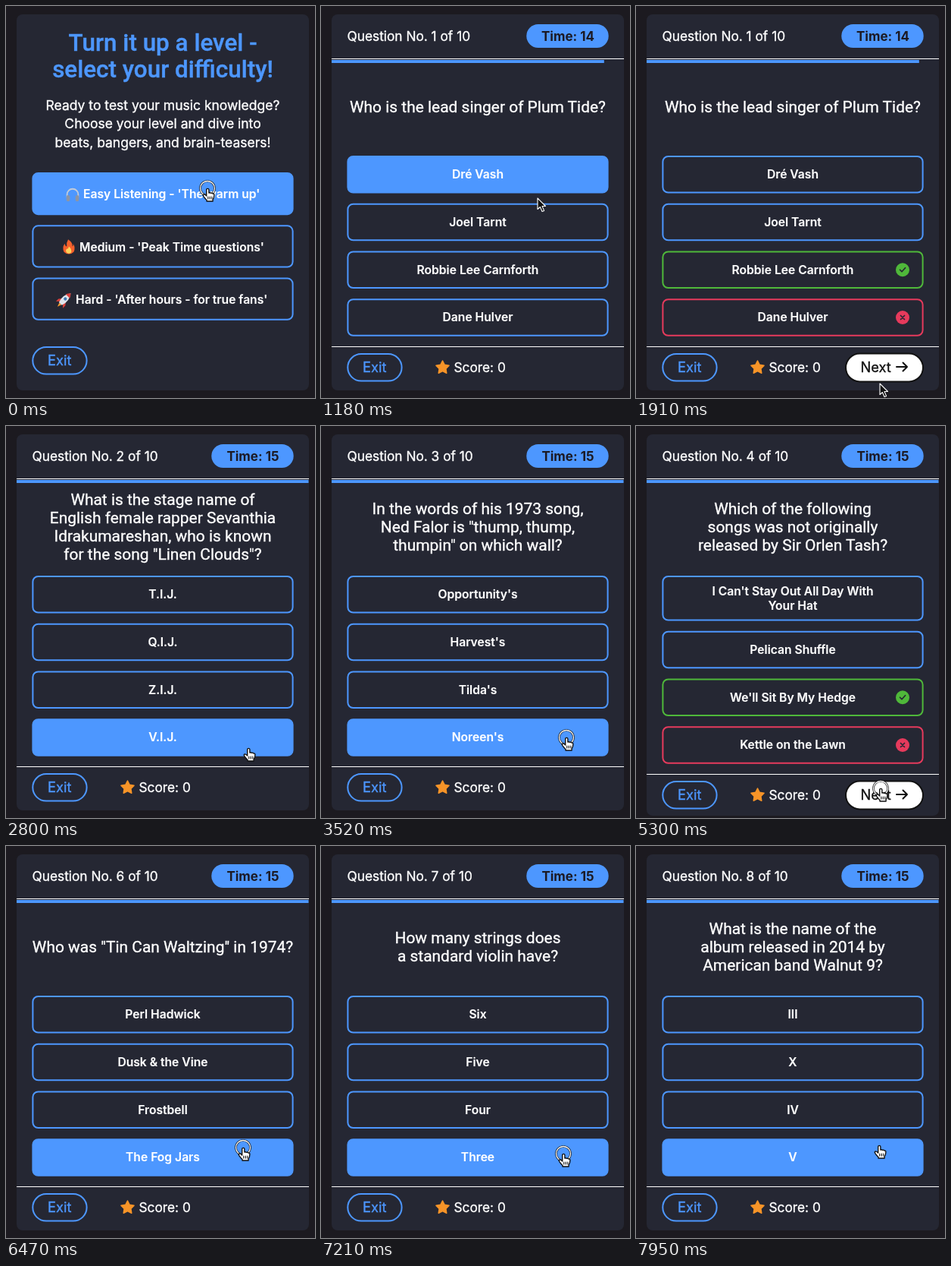
Write an HTML page that moves like this. It is 408 by 516 pixels and loops after 8000 ms.

```html
<!DOCTYPE html>
<html lang="en">
<head>
<meta charset="utf-8">
<title>Music quiz</title>
<style>
html, body { margin: 0; width: 100%; height: 100%; overflow: hidden; background: #1c1a20; }
svg { display: block; }
text { font: 17.3px Inter, sans-serif; fill: #fff; stroke: #fff; stroke-width: .35px; font-variant-ligatures: none; }
.mid { text-anchor: middle; }
.title { font: 500 31.4px Roboto, sans-serif; fill: #4d97ff; stroke: #4d97ff; }
.intro { font-size: 17.5px; }
.ask { font: 20.95px Roboto, sans-serif; }
.opt { font-weight: 600; font-size: 15.65px; stroke-width: .15px; }
.time { font-weight: 700; font-size: 17px; fill: #1c1a24; stroke: none; }
.btn { font-size: 18.3px; }
.exit { fill: #4d97ff; stroke: #4d97ff; }
.next { fill: #111; stroke: #111; }
</style>
</head>
<body>
<svg id="stage" width="408" height="516" viewBox="0 0 408 516"></svg>
<script>
const LOOP = 8000, TICK = 147.2, LEAD = 14;
const BLUE = '#4d97ff', PANEL = '#252733', GREEN = '#4fb83a', RED = '#e63a5c';
const PICKED = 3; // the player always answers with the last option

// start and done are ticks: question appears, answer is revealed
const questions = [
  { start: 1, done: 13, right: 2, ask: ['Who is the lead singer of Plum Tide?'],
    options: ['Dré Vash', 'Joel Tarnt', 'Robbie Lee Carnforth', 'Dane Hulver'] },
  { start: 18, done: 21, right: 1,
    ask: ['What is the stage name of', 'English female rapper Sevanthia', 'Idrakumareshan, who is known', 'for the song "Linen Clouds"?'],
    options: ['T.I.J.', 'Q.I.J.', 'Z.I.J.', 'V.I.J.'] },
  { start: 23, done: 25, right: 1,
    ask: ['In the words of his 1973 song,', 'Ned Falor is "thump, thump,', 'thumpin" on which wall?'],
    options: ["Opportunity's", "Harvest's", "Tilda's", "Noreen's"] },
  { start: 28, done: 31, right: 2,
    ask: ['Which of the following', 'songs was not originally', 'released by Sir Orlen Tash?'],
    options: ["I Can't Stay Out All Day With|Your Hat", 'Pelican Shuffle', "We'll Sit By My Hedge", 'Kettle on the Lawn'] },
  { start: 37, done: 40, right: 1, ask: ['Which instrument has', '88 black and white keys?'],
    options: ['Trumpet', 'Piano', 'Cello', 'Flute'] },
  { start: 43, done: 45, right: 0, ask: ['Who was "Tin Can Waltzing" in 1974?'],
    options: ['Perl Hadwick', 'Dusk &amp; the Vine', 'Frostbell', 'The Fog Jars'] },
  { start: 48, done: 50, right: 2, ask: ['How many strings does', 'a standard violin have?'],
    options: ['Six', 'Five', 'Four', 'Three'] },
  { start: 53, done: 99, right: 3,
    ask: ['What is the name of the', 'album released in 2014 by', 'American band Walnut 9?'],
    options: ['III', 'X', 'IV', 'V'] }
];

// pointer path: tick, x, y
const path = [
  [0, 266, 240], [3, 266, 240], [7, 280, 246], [8, 286, 253], [9, 297, 285], [10, 312, 345],
  [11, 321, 400], [12, 321, 405], [13, 322, 497], [14, 322, 490], [15, 322, 490], [17, 322, 478],
  [18, 321, 430], [19, 320, 424], [20, 321, 420], [22, 323, 476], [23, 323, 425], [24, 324, 410],
  [25, 324, 435], [27, 324, 475], [28, 323, 465], [29, 322, 428], [31, 321, 419], [32, 321, 460],
  [33, 321, 460], [34, 322, 470], [36, 323, 477], [37, 322, 455], [38, 320, 412], [39, 319, 408],
  [40, 320, 435], [42, 320, 472], [43, 314, 412], [44, 313, 397], [45, 315, 425], [47, 320, 475],
  [48, 320, 420], [49, 320, 405], [50, 320, 430], [52, 321, 474], [53, 321, 410], [54, 321, 394]
];

function pointerAt(tick) {
  const i = path.findIndex(p => p[0] >= tick);
  if (i < 1) return path[0].slice(1);
  const [t0, x0, y0] = path[i - 1], [t1, x1, y1] = path[i];
  const k = (tick - t0) / (t1 - t0);
  return [x0 + (x1 - x0) * k, y0 + (y1 - y0) * k];
}

const text = (x, y, cls, str) => `<text x="${x}" y="${y}" class="${cls}">${str}</text>`;
const rect = (x, y, w, h, r, fill, stroke = 'none') =>
  `<rect x="${x}" y="${y}" width="${w}" height="${h}" rx="${r}" fill="${fill}" stroke="${stroke}" stroke-width="2"/>`;
const shape = (d, fill, stroke = 'none', width = 1) =>
  `<path d="${d}" fill="${fill}" stroke="${stroke}" stroke-width="${width}" stroke-linecap="round" stroke-linejoin="round"/>`;
const at = (x, y, content, scale = 1) => `<g transform="translate(${x} ${y}) scale(${scale})">${content}</g>`;
const lines = (list, y, gap, cls) =>
  list.map((s, i) => text(207, y + (i - (list.length - 1) / 2) * gap, cls + ' mid', s)).join('');

const box = (b, fill, stroke) => rect(35.4, b.y + 1, 343.2, b.h - 2, 7, fill, stroke);
const panel = bottom => rect(14, 11, 386, bottom - 11, 8, PANEL);
const exit = y => rect(35.3, y - 18, 71.3, 35.6, 17.8, 'none', BLUE) + text(55, y + 6.3, 'btn exit', 'Exit');

const headphones = shape('M-8 4V0A8 8 0 0 1 8 0V4', 'none', '#c3cbd8', 2) +
  rect(-9, 1, 5, 9, 2.5, '#8d95a5') + rect(4, 1, 5, 9, 2.5, '#8d95a5');
const fire = shape('M-1-11Q6-6 5-1 7-2 6-5 10 1 7 7 4 10 0 10-4 10-7 7-10 1-6-5-5-1-3-1-4-6-1-11Z', '#f5602c') +
  shape('M0-1Q5 3 3 8 0 10-3 8-6 4-2 2-1 3 0-1Z', '#ffd35a');
const rocket = `<g transform="rotate(45)">` + shape('M-2 8H2L0 14Z', '#ff9d2e') +
  shape('M-3 0-7 5V10L-3 6H3L7 10V5L3 0Z', '#d9403c') + shape('M0-13Q7-4 3 8H-3Q-7-4 0-13Z', '#dfe5ec') +
  shape('M0-13Q3-10 4-7H-4Q-3-10 0-13Z', '#d9403c') + '<circle cy="-2" r="2.3" fill="#3f77b0"/></g>';
const star = shape(Array.from({ length: 10 }, (_, i) => {
  const a = i * Math.PI / 5, r = i % 2 ? 4.6 : 9;
  return (i ? 'L' : 'M') + (r * Math.sin(a)).toFixed(2) + ' ' + (-r * Math.cos(a)).toFixed(2);
}).join('') + 'Z', '#f79428', '#f79428', 1.5);
const badge = (color, d) => `<circle r="9" fill="${color}"/>` + shape(d, 'none', PANEL, 1.7);

const arrow = shape('M0 0V14.5L3.4 11.5 6 17.5 8.6 16.4 6 10.5H10.5Z', '#111', '#fff', 1.1);
const hand = at(1, 0, shape('M-2.3 2a1.6 1.6 0 0 1 3.2 0V6q1.6-.8 2.6.4 1.6-.7 2.4.6 2-.4 2 1.6 0 4-1.8 6.2V17H-2v-1.5q-2.4-2.4-4.3-5.2-1.2-2.2 1-2.4 1.3.2 3 2Z', '#fff', '#111', 1.4) +
  shape('M-.2 11v3M2.3 11v3M4.8 11v3', 'none', '#111', 1.1));
const ring = '<circle r="9.5" fill="none" stroke="#111" stroke-width="2.6"/><circle r="9.5" fill="none" stroke="#fff" stroke-width="1.3"/>';

const menuBoxes = [0, 1, 2].map(i => ({ y: 219 + 69.3 * i, h: 56.2 }));

function quizBoxes(q) {
  const extra = q.options[0].includes('|') ? 10 : 0;
  return q.options.map((_, i) => ({
    y: 197 + 62.75 * i + (i ? extra : 0), h: 49.5 + (i ? 0 : extra)
  }));
}

function menu(hover) {
  const items = [
    [88, 102, headphones, "Easy Listening - 'The warm up'"],
    [83, 97, fire, "Medium - 'Peak Time questions'"],
    [77, 92, rocket, "Hard - 'After hours - for true fans'"]
  ];
  return panel(506) +
    lines(['Turn it up a level -', 'select your difficulty!'], 76.8, 35, 'title') +
    lines(['Ready to test your music knowledge?', 'Choose your level and dive into', 'beats, bangers, and brain-teasers!'], 161.3, 24.5, 'intro') +
    items.map(([iconX, textX, icon, label], i) => {
      const b = menuBoxes[i], y = b.y + b.h / 2;
      return box(b, i === hover ? BLUE : 'none', BLUE) + at(iconX, y + 1, icon, 0.92) + text(textX, y + 6.3, 'opt', label);
    }).join('') + exit(467);
}

function quiz(q, boxes, tick, hover) {
  const done = tick >= q.done;
  const extra = boxes[0].h > 50 ? 10 : 0;
  const left = q.start === 1 && tick >= 8 ? 14 : 15;
  const foot = 476 + extra;
  const option = (label, i) => {
    const b = boxes[i], y = b.y + b.h / 2;
    const right = done && i === q.right, wrong = done && !right && i === PICKED;
    return box(b, i === hover ? BLUE : 'none', right ? GREEN : wrong ? RED : BLUE) +
      lines(label.split('|'), y + 5.3, 19, 'opt') +
      (right ? at(352, y, badge(GREEN, 'M-3.5 0-1 2.5 3.5-2.5')) : '') +
      (wrong ? at(352, y, badge(RED, 'M-2.5-2.5 2.5 2.5M2.5-2.5-2.5 2.5')) : '');
  };
  return panel(extra ? 513 : 506) +
    text(34.5, 46, '', `Question No. ${questions.indexOf(q) + 1} of 10`) +
    rect(271.3, 24, 108.4, 31, 15.5, BLUE) + text(326, 46, 'time mid', 'Time: ' + left) +
    rect(14, 69, 386, 1, 0, '#fff') + rect(14, 71, 385.5 * left / 15, 4, 0, BLUE) +
    lines(q.ask, 140, 24, 'ask') +
    q.options.map(option).join('') +
    rect(14, foot - 28, 386, 1, 0, '#fff') + exit(foot) +
    at(160.5, foot, star) + text(175.5, foot + 6, '', 'Score: 0') +
    (done ? rect(277, foot - 18.5, 102, 37, 18.5, '#fff', '#111') +
      text(296.5, foot + 6.3, 'btn next', 'Next') +
      at(351, foot - 1, shape('M-7 0H7M1.5-5.5 7 0 1.5 5.5', 'none', '#111', 2)) : '');
}

function draw(tick) {
  const q = questions.filter(item => item.start <= tick).pop();
  const boxes = q ? quizBoxes(q) : menuBoxes;
  const over = y => boxes.findIndex(b => y >= b.y && y <= b.y + b.h);
  const [x, y] = pointerAt(tick);
  const done = q && tick >= q.done;
  // the highlight trails the pointer by one tick
  const hover = done || (q && tick === q.start) ? -1 : over(pointerAt(tick - 1)[1]);
  const nextTop = boxes[boxes.length - 1].y + 72;
  const onNext = done && y >= nextTop && y <= nextTop + 38;
  const click = questions.some(item => [item.start, item.done].includes(tick + 1));
  return (q ? quiz(q, boxes, tick, hover) : menu(hover)) +
    at(x, y, (click ? ring : '') + (over(y) >= 0 || onNext ? hand : arrow));
}

const stage = document.getElementById('stage');
let shown = -1;
function frame() {
  const tick = Math.floor((performance.now() % LOOP + LEAD) / TICK);
  if (tick !== shown) {
    shown = tick;
    stage.innerHTML = draw(Math.min(tick, 54));
  }
  requestAnimationFrame(frame);
}
frame();
</script>
</body>
</html>
```
